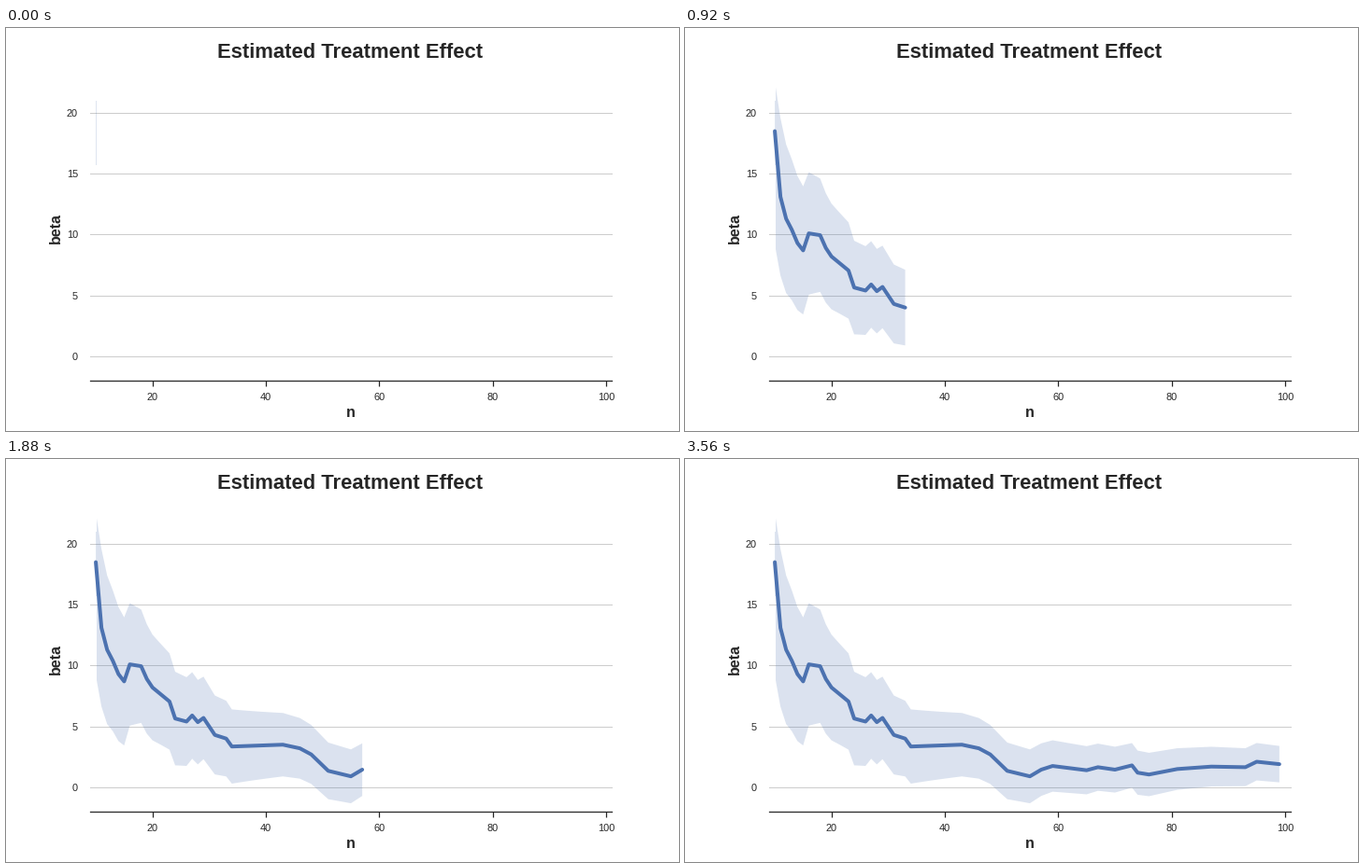
Recreate the animation shown at these times as a matplotlib script. Size 720 by 432 pixels, loop 4.51 s.

```python
import numpy as np
import matplotlib.pyplot as plt
from matplotlib.animation import FuncAnimation
from matplotlib.patches import Polygon

W, H, DPI = 720, 432, 72
LEFT, RIGHT, TOP, BOTTOM = 90, 648, 51.84, 378
INK, GRID, BLUE = "0.15", "0.8", "#4c72b0"
LOOP_MS, TICK_MS, STEP_MS = 4510, 10, 40

plt.rcParams["font.family"] = "Liberation Sans"


def px(n):
    return LEFT + (n - 9) * (RIGHT - LEFT) / 92


def py(v):
    return BOTTOM - (v + 2) * (BOTTOM - TOP) / 25


# Turning points (n, beta) of the estimate
KEYS = [
    (10, 18.5), (11, 13.1), (12, 11.3), (13, 10.4), (14, 9.3), (15, 8.7),
    (16, 10.1), (18, 9.95), (19, 8.9), (20, 8.2), (23, 7.05), (24, 5.65),
    (26, 5.4), (27, 5.9), (28, 5.35), (29, 5.7), (31, 4.3), (33, 4.0),
    (34, 3.35), (43, 3.5), (46, 3.2), (48, 2.7), (51, 1.35), (55, 0.9),
    (57, 1.45), (59, 1.75), (65, 1.4), (67, 1.65), (70, 1.45), (73, 1.8),
    (74, 1.2), (76, 1.05), (81, 1.5), (87, 1.7), (93, 1.65), (95, 2.1),
    (99, 1.9),
]
n = np.arange(10, 100)
beta = np.interp(n, *zip(*KEYS))

# The interval narrows as the sample grows
half = 32 * n ** (-2 / 3)
upper, lower = beta + half, beta - half
upper[0], lower[0] = 22.1, 8.8

line_x, line_y = px(n), py(beta)
band_x = np.maximum(line_x, 97)
band_top, band_low = py(upper), py(lower)

fig = plt.figure(figsize=(W / DPI, H / DPI), dpi=DPI, facecolor="white")
ax = fig.add_axes([0, 0, 1, 1])
ax.set_xlim(0, W)
ax.set_ylim(H, 0)
ax.axis("off")


def segment(x, y, color, width, cap="projecting", **style):
    ax.plot(x, y, color=color, lw=width, solid_capstyle=cap, zorder=1, **style)


def label(x, y, text, size=11, ha="center", va="baseline", **style):
    ax.text(x, y, text, fontsize=size, color=INK, ha=ha, va=va, **style)


for v in range(0, 21, 5):
    segment([LEFT, RIGHT], [py(v)] * 2, GRID, 1)
    label(77, py(v), str(v), ha="right", va="center_baseline")

segment([LEFT, RIGHT], [BOTTOM] * 2, INK, 1.25)
for v in range(20, 101, 20):
    segment([px(v)] * 2, [BOTTOM, BOTTOM + 6], INK, 1.25, cap="butt")
    label(px(v), 399, str(v))

centre = (LEFT + RIGHT) / 2
label(centre - 0.5, TOP - 20, "Estimated Treatment Effect", 22, weight="bold")
label(centre, 417, "n", 16, weight="bold")
label(58.4, (TOP + BOTTOM) / 2, "beta", 16, weight="bold",
      rotation=90, rotation_mode="anchor")

# Thin interval mark at the first sample size
segment([px(10)] * 2, [77.5, 145.5], BLUE, 1, alpha=0.18)

band = ax.add_patch(Polygon([(97, 100)] * 3, facecolor=BLUE, alpha=0.2, lw=0, zorder=2))
curve, = ax.plot([], [], color=BLUE, lw=4, solid_capstyle="round",
                 solid_joinstyle="round", zorder=3)


def draw(i):
    k = min(i * TICK_MS // STEP_MS, len(n) - 1) + 1
    visible = k > 1
    band.set_visible(visible)
    curve.set_visible(visible)
    if visible:
        xs = np.r_[band_x[:k], band_x[:k][::-1]]
        ys = np.r_[band_top[:k], band_low[:k][::-1]]
        band.set_xy(np.c_[xs, ys])
        curve.set_data(line_x[:k], line_y[:k])
    return band, curve


anim = FuncAnimation(fig, draw, frames=LOOP_MS // TICK_MS, interval=TICK_MS,
                     repeat=True, repeat_delay=0, blit=False)
plt.show()
```
